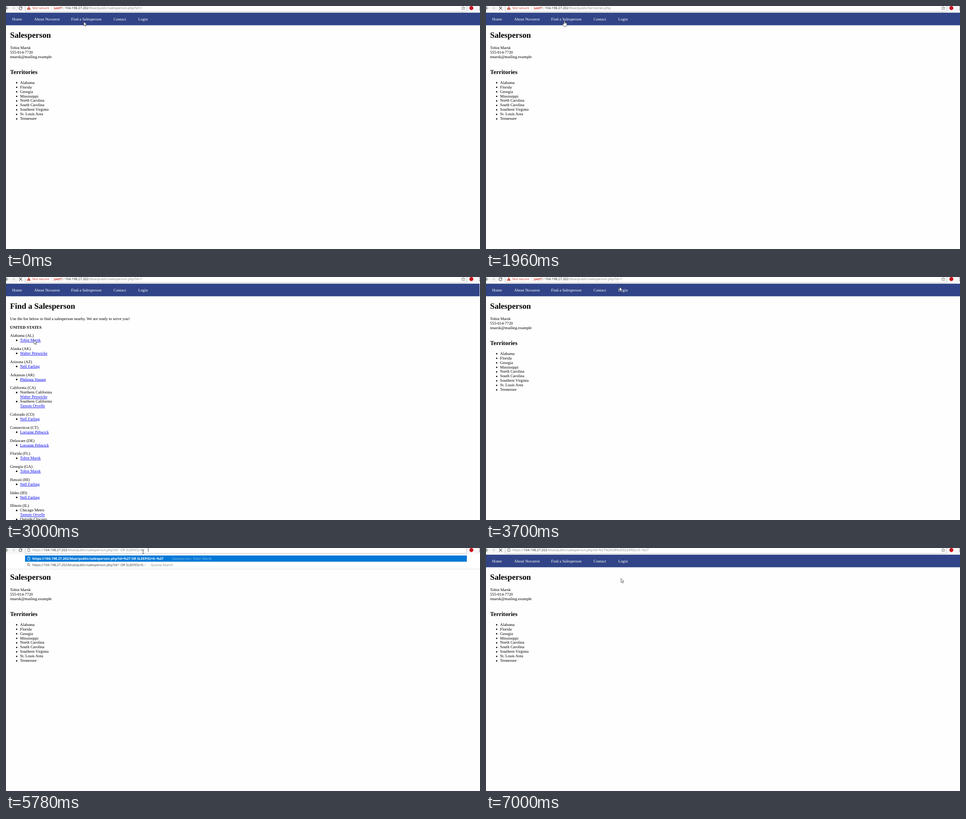
Animation of 1045x536 px, one loop 8000 ms. Source, as an HTML page:

```html
<!DOCTYPE html>
<html lang="en">
<head>
<meta charset="utf-8">
<title>Salesperson</title>
<style>
  html, body { margin: 0; width: 100%; height: 100%; overflow: hidden; background: #fefefe; }
  svg { display: block; width: 1045px; height: 536px; }
  text { font: 8.9px "Liberation Serif", serif; text-rendering: geometricPrecision; white-space: pre; }
  .h1 { font-size: 17.8px; font-weight: bold; }
  .h2 { font-size: 13.2px; font-weight: bold; }
  .b { font-weight: bold; }
  .nav { fill: #fff; }
  .link { fill: #00e; text-decoration: underline; }
  .ui { font: 7.33px "Open Sans", "Noto Sans", sans-serif; fill: #808080; }
  .ui .host { fill: #222; }
  .ui.dark { fill: #333; }
  .ui.red, .ui .red { fill: #c5392b; }
  .ui.pick { fill: #fff; font-weight: bold; }
  .ui.note { fill: #8cc2ef; }
</style>
</head>
<body>
<svg id="stage" viewBox="0 0 1045 536"></svg>
<script>
const LOOP = 8000;
const stage = document.getElementById('stage');

const text = (x, y, s, cls = '') => `<text x="${x}" y="${y}" class="${cls}">${s}</text>`;
const rect = (x, y, w, h, fill, extra = '') =>
  `<rect x="${x}" y="${y}" width="${w}" height="${h}" fill="${fill}" ${extra}/>`;
const line = (d, color, width = 1) =>
  `<path d="${d}" fill="none" stroke="${color}" stroke-width="${width}"/>`;

// Pages
const ann = 'Tobin Marsk', walter = 'Walter Penwicke', nell = 'Nell Farling',
  philippa = 'Philippa Vossen', tamsin = 'Tamsin Orvelle', lorraine = 'Lorraine Pebwick';

const nav = rect(0, 14.5, 1045, 28, '#304487') +
  [[13.5, 'Home'], [62, 'About Nuvarest'], [143.5, 'Find a Salesperson'], [237, 'Contact'], [291.5, 'Login']]
    .map(([x, s]) => text(x, 32, s, 'nav')).join('');

const profile = nav + text(9, 70.3, 'Salesperson', 'h1') +
  [ann, '555-014-7720', 'tmarsk@mailing.example'].map((s, i) => text(9, 94.5 + i * 10, s)).join('') +
  text(9, 149.5, 'Territories', 'h2') +
  ['Alabama', 'Florida', 'Georgia', 'Mississippi', 'North Carolina', 'South Carolina',
    'Southern Virginia', 'St. Louis Area', 'Tennessee']
    .map((s, i) => `<circle cx="23.5" cy="${169.3 + i * 9.97}" r="1.5"/>` + text(31, 171.6 + i * 9.97, s)).join('');

// Each state is followed by its salesperson, or by area and salesperson pairs.
const states = [
  ['Alabama (AL)', ann], ['Alaska (AK)', walter], ['Arizona (AZ)', nell], ['Arkansas (AR)', philippa],
  ['California (CA)', 'Northern California', walter, 'Southern California', tamsin],
  ['Colorado (CO)', nell], ['Connecticut (CT)', lorraine], ['Delaware (DE)', lorraine],
  ['Florida (FL)', ann], ['Georgia (GA)', ann], ['Hawaii (HI)', nell], ['Idaho (ID)', nell],
  ['Illinois (IL)', 'Chicago Metro', tamsin, 'Outside Chicago', tamsin]
];

function directoryPage() {
  let out = nav + text(9, 70.3, 'Find a Salesperson', 'h1') +
    text(9, 94.5, 'Use the list below to find a salesperson nearby. We are ready to serve you!') +
    text(9, 113.5, 'UNITED STATES', 'b');
  let y = 132.3;
  for (const [state, ...rows] of states) {
    out += text(9, y, state);
    rows.forEach((row, i) => {
      y += 9.97;
      const isName = rows.length === 1 || i % 2 === 1;
      if (rows.length === 1 || i % 2 === 0) out += rect(22, y - 4, 3, 3, '#000');
      out += text(31, y, row, isName ? 'link' : '');
    });
    y += 18.8;
  }
  return out + rect(1044, 14, 1, 522, '#f1f1f1');
}
const directory = directoryPage();

// Browser bar
const host = '<tspan class="host">104.198.27.202</tspan>';
const base = '/blue/public/';
const query = "salesperson.php?id=' OR SLEEP(5)=0--'";

const pageIcon = (y, color) =>
  line(`M48 ${y - 3.3}h3l1.8 1.8v5h-4.8zM50.8 ${y - 3.3}v2h2`, color, .8);

const reloadIcon = line('M34.6 2.9A3.3 3.3 0 1 0 35.2 5.4', '#555', 1.1) +
  '<path d="M35.6 1v3.5h-3.5z" fill="#555"/>';
const stopIcon = line('M29 1.5l6.4 6.4m0-6.4l-6.4 6.4', '#555', 1.1);

const insecure = path =>
  '<path d="M50.3 .6l4.2 7.4h-8.4z" fill="#c5392b"/>' + rect(49.9, 3, .9, 2.6, '#fff') + rect(49.9, 6.2, .9, .9, '#fff') +
  text(58, 7.3, 'Not secure', 'ui red') + rect(100, 0, .8, 9, '#ccc') +
  text(105, 7.3, `<tspan class="red">https</tspan>://${host}${base}${path}`, 'ui') +
  line('M105 7.3L124 2', '#c5392b', .9);

const plainUrl = path => text(58, 7.3, `https://${host}${base}${path}`, 'ui');

const star = line('M1008 .8l1.1 2.6 2.8.2-2.2 1.8.7 2.8-2.4-1.5-2.4 1.5.7-2.8-2.2-1.8 2.8-.2z', '#666', .8);

function toolbar(content, loading, starred) {
  return rect(0, 0, 1045, 14.5, '#f6f6f6') + rect(42.5, -5, 973, 17, '#fff', 'rx="1" stroke="#bcbcbc" stroke-width=".9"') +
    line('M5 4.7H-1M2.5 1.2L-1 4.7l3.5 3.5', '#555', 1.1) +
    line('M12.5 4.7h7M16.4 1.4l3.3 3.3-3.3 3.3', '#ccc', 1.1) +
    (loading ? stopIcon : reloadIcon) + content + (starred ? star : '') +
    '<circle cx="1026" cy="4.5" r="4.4" fill="#c8141e"/>' +
    [1, 4.5, 8].map(y => rect(1043.3, y - .7, 1.5, 1.5, '#555')).join('');
}

const suggestions = rect(0, 13, 1045, 33.5, '#fff') + rect(0, 46, 1045, .8, '#ddd') +
  rect(42, 16.5, 974, 13.7, '#0078d7') + pageIcon(23.3, '#fff') +
  text(58, 25.8, `https://104.198.27.202${base}salesperson.php?id=%27 OR SLEEP(5)=0--%27`, 'ui pick') +
  text(362, 25.8, '- Salesperson: ' + ann, 'ui note') +
  '<circle cx="49.3" cy="36.3" r="2.1" fill="none" stroke="#555"/>' + line('M50.9 37.9l2.6 2.6', '#555') +
  text(58, 39.7, `https://104.198.27.202${base}${query}`, 'ui dark') +
  text(315, 39.7, '- Quovia Search', 'ui');

// Mouse pointers, placed by tip (arrow, hand) or centre (beam)
const pointers = {
  arrow: '<path d="M0 0v9l2.1-1.9 1.5 3.3 1.5-.7-1.5-3.2h2.8z" fill="#fff" stroke="#222" stroke-width=".7"/>',
  hand: '<path d="M-1 6.8V.9Q0-.6 1 .9v3.2l3.3.7q.9.3.9 1.3v2.7L4 12.5h-5L-4 7.6q-.2-1.3 1.2-1z" fill="#fff" stroke="#222" stroke-width=".7"/>' +
    line('M1 4v2.4M2.7 4.5v2M4 5v1.6', '#222', .5),
  beam: line('M-1.8-4.3h1.4l.4.4.4-.4h1.4M0-4v8M-1.8 4.3h1.4l.4-.4.4.4h1.4', '#222', .8)
};
const moves = [
  [0, 'arrow', 171.5, 34.5], [150, 'arrow', 168.8, 33], [300, 'hand', 173.5, 30],
  [600, 'arrow', 215, 19], [730, 'arrow', 262, 9], [850, 'arrow', 268, 7],
  [990, 'arrow', 222, 29], [1110, 'arrow', 172, 45], [1260, 'hand', 173, 36], [1380, 'hand', 173, 32.5],
  [2120, 'arrow', 134, 78], [2270, 'arrow', 92.5, 108], [2430, 'arrow', 73.5, 126],
  [2570, 'arrow', 65, 134], [2700, 'hand', 62.5, 138.7], [2860, 'arrow', 61.8, 139],
  [3130, 'arrow', 190, 77], [3250, 'hand', 297.5, 30], [3420, 'hand', 294.5, 29], [3550, 'hand', 298, 28],
  [3700, 'arrow', 294.5, 22], [3860, 'arrow', 294, 15.8], [4000, 'arrow', 293.8, 11],
  [4130, 'beam', 296.5, 10.5], [4280, 'beam', 297, 9.5], [4410, 'beam', 297.3, 9],
  [4550, 'beam', 298, 8.5], [4680, 'beam', 298.7, 8.3], [4820, 'beam', 300.5, 8.3], [4940, 'beam', 302.3, 8.3],
  [6210, 'arrow', 299, 42], [6330, 'arrow', 297.6, 67]
];

function pointer(t) {
  const [, kind, x, y] = moves.filter(m => m[0] <= t).pop();
  return `<g transform="translate(${x} ${y})">${pointers[kind]}</g>`;
}

function addressBar(t) {
  if (t >= 7000) {
    const info = '<circle cx="50.3" cy="4.5" r="3.5" fill="none" stroke="#555" stroke-width=".8"/>' +
      rect(49.9, 4, .9, 2.6, '#555') + rect(49.9, 2.3, .9, .9, '#555');
    return toolbar(info + plainUrl('salesperson.php?id=%27%20OR%20SLEEP(5)=0--%27'), true, true);
  }
  if (t >= 5780) {
    const caretOn = t < 6210 || t >= 6730;
    return toolbar(pageIcon(4.5, '#666') + plainUrl(query) + (caretOn ? rect(313, 0, .8, 8.5, '#222') : ''), false, false) +
      suggestions;
  }
  const loading = t >= 1660 && t < 2120 || t >= 3000 && t < 3130;
  let content = insecure(t >= 1960 && t < 3000 ? 'territories.php' : 'salesperson.php?id=1');
  if (t >= 4820) content += rect(296, 0, 5, 9, '#0078d7') + '<text x="296.2" y="7.3" class="ui" style="fill:#fff">1</text>';
  else if (t >= 4550) content += rect(296, 0, .7, 8.5, '#222');
  return toolbar(content, loading, true);
}

let shown = '';
function draw(now) {
  const t = now % LOOP;
  const page = t >= 2120 && t < 3130 ? directory : profile;
  const picture = page + addressBar(t) + pointer(t);
  if (picture !== shown) stage.innerHTML = shown = picture;
  requestAnimationFrame(draw);
}
draw(performance.now());
</script>
</body>
</html>
```
